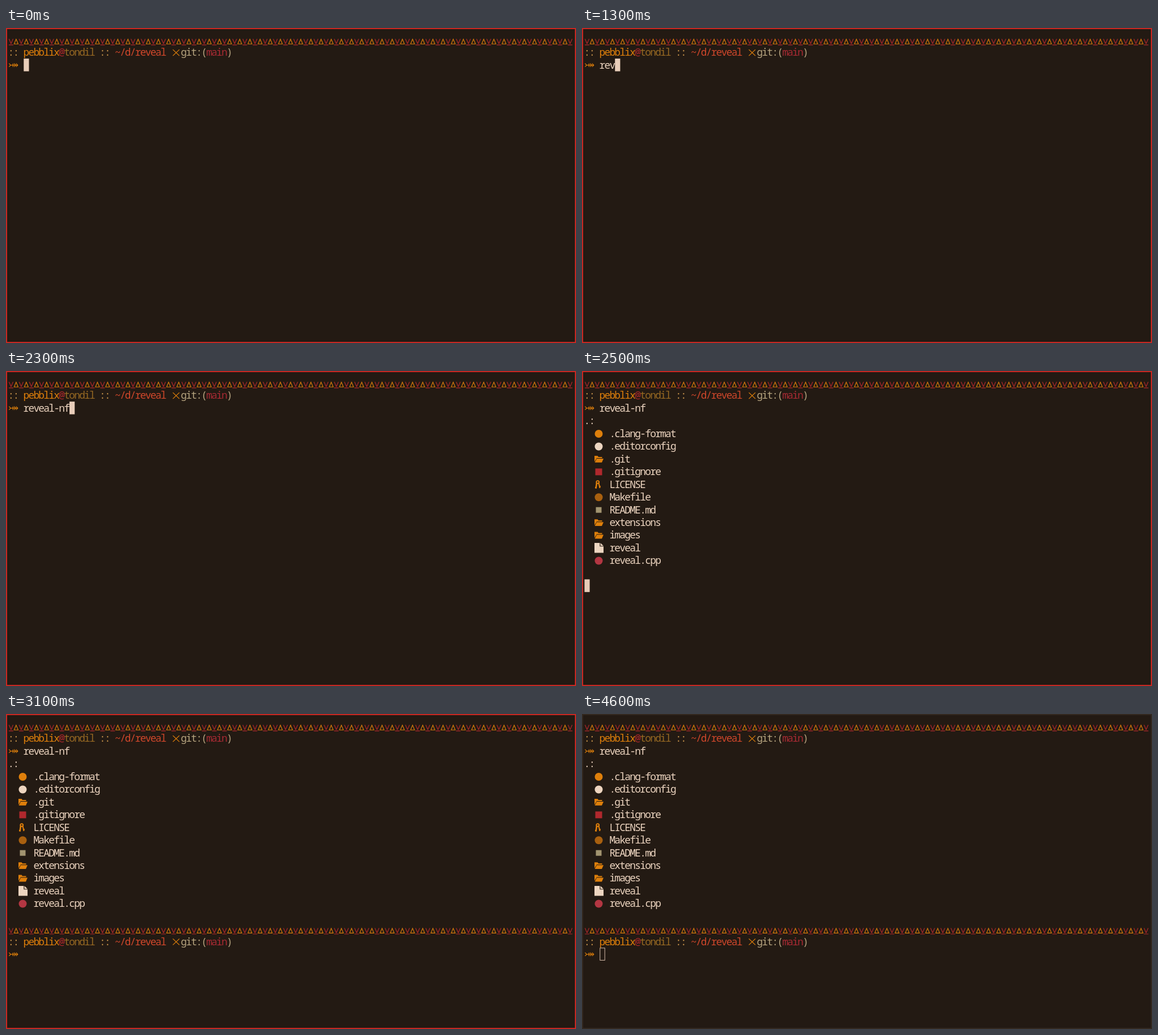
Animation, 1006 px wide and 557 px high, one loop 4.8 s. Source, as an HTML page with a canvas:

```html
<!DOCTYPE html>
<html lang="en">
<head>
<meta charset="utf-8">
<title>Terminal listing</title>
<style>
  html, body { margin: 0; width: 100%; height: 100%; overflow: hidden; background: #231a13; }
  canvas { display: block; }
</style>
</head>
<body>
<canvas id="stage" width="1006" height="557"></canvas>
<script>
const ctx = document.getElementById('stage').getContext('2d');
const LOOP = 4800, COLS = 111;
const CELL_W = 8.97, CELL_H = 22.45, LEFT = 4.4, TOP = 9.2;
const color = {
  back: '#231a13', text: '#edd5c0', orange: '#de7f0b', red: '#b0282d', crimson: '#b33642',
  brown: '#966822', gold: '#cb964c', path: '#d0472b', tan: '#b5a37e', branch: '#a82a33',
  focused: '#c92822', unfocused: '#33281f'
};
const colX = col => LEFT + col * CELL_W;
const rowY = row => TOP + row * CELL_H;

// Each letter is centred in its own terminal cell.
function write(text, col, row, fill = color.text) {
  ctx.fillStyle = fill;
  [...text].forEach((ch, i) => ctx.fillText(ch, colX(col + i + 0.5), rowY(row) + 17.8));
}

function stroke(path, x, y, paint, width = 1.15) {
  ctx.save();
  ctx.translate(x, y);
  ctx.strokeStyle = paint;
  ctx.lineWidth = width;
  ctx.stroke(new Path2D(path));
  ctx.restore();
}

function fill(path, row, paint) {
  ctx.save();
  ctx.translate(22, rowY(row));
  ctx.fillStyle = paint;
  ctx.fill(new Path2D(path));
  ctx.restore();
}

const dot = paint => row => {
  ctx.fillStyle = paint;
  ctx.beginPath();
  ctx.arc(29.5, rowY(row) + 12, 7, 0, 7);
  ctx.fill();
};
const square = (paint, size) => row => {
  ctx.fillStyle = paint;
  ctx.fillRect(29.5 - size / 2, rowY(row) + 12 - size / 2, size, size);
};
const folder = row =>
  fill('M0 6h5.5l1.5 2h6.5v2H4L0 16.5zM4 11h12l-3 6.8H.5z', row, color.orange);
const sheet = row =>
  fill('M0 3h9.3v6.2H16V20.5H0zM10.5 3L16 8.2h-5.5z', row, color.text);
const keys = row => {
  stroke('M5.8 5.2a2.4 2.4 0 1 1-.1 0M7.5 9.3l2 9', 22, rowY(row), color.orange, 2.1);
  stroke('M4 9l-1.5 10M1 17.5h3M8 15.5h2.8', 22, rowY(row), color.orange, 2.6);
};

const files = [
  ['.clang-format', dot(color.orange)],
  ['.editorconfig', dot(color.text)],
  ['.git', folder],
  ['.gitignore', square(color.red, 12)],
  ['LICENSE', keys],
  ['Makefile', dot('#a9600f')],
  ['README.md', square('#a29470', 10)],
  ['extensions', folder],
  ['images', folder],
  ['reveal', sheet],
  ['reveal.cpp', dot(color.crimson)]
];

function drawPrompt(row) {
  for (let col = 0; col < COLS; col++) {
    const x = colX(col), y = rowY(row) + 1;
    if (col % 2) stroke('M1 18L4.5 9.6 8 18z', x, y, color.orange);
    else stroke('M.9 9l3.6 8.4L8.1 9M.5 19.6h8', x, y, color.red);
  }
  const parts = [
    ['::', 0, color.gold], ['pebblix', 3, color.orange], ['@', 10, color.red],
    ['tondil', 11, color.brown], ['::', 18, color.gold], ['~/d/reveal', 21, color.path],
    ['git:(', 34, color.tan], ['main', 39, color.branch], [')', 43, color.tan]
  ];
  for (const [text, col, paint] of parts) write(text, col, row + 1, paint);
  stroke('M0 0l11.5 11M11.5 0L0 11', 294.5, rowY(row + 1) + 6.5, color.orange, 1.3);
  stroke('M0 -3l3 3-3 3M3 0H15.5M7 -3v6M9 -3l3 3-3 3M12.5 -3l3 3-3 3',
    5.3, rowY(row + 2) + 11.6, color.orange, 1.2);
}

function drawListing() {
  write('.:', 0, 3);
  files.forEach(([name, icon], i) => {
    icon(i + 4);
    write(name, 5, i + 4);
  });
}

function drawCursor(col, row, hollow) {
  const x = colX(col), y = rowY(row);
  ctx.fillStyle = ctx.strokeStyle = '#e8cdb9';
  ctx.lineWidth = 0.9;
  if (hollow) ctx.strokeRect(x + 0.5, y + 0.5, 8.4, 21.6);
  else ctx.fillRect(x, y, 9.2, CELL_H);
}

const command = 'reveal-nf';
const keyTimes = [1000, 1100, 1300, 1500, 1500, 1700, 2000, 2200, 2300];

function draw(t) {
  const idle = t >= 4600;
  ctx.fillStyle = color.back;
  ctx.fillRect(0, 0, 1006, 557);
  ctx.strokeStyle = idle ? color.unfocused : color.focused;
  ctx.lineWidth = 2;
  ctx.strokeRect(1, 1, 1004, 555);
  ctx.font = "500 condensed 17.8px 'Noto Sans Mono', monospace";
  ctx.textAlign = 'center';

  drawPrompt(0);
  const typed = keyTimes.filter(time => time <= t).length;
  write(command.slice(0, typed), 3, 2);
  if (t >= 2500) drawListing();
  if (t >= 2600) drawPrompt(16);

  const hidden = (t >= 400 && t < 900) || (t >= 3100 && t < 3600) || (t >= 4100 && t < 4600);
  if (hidden) return;
  if (t < 2500) drawCursor(3 + typed, 2);
  else if (t < 2600) drawCursor(0, 16);
  else drawCursor(3, 18, idle);
}

function tick() {
  draw(performance.now() % LOOP);
  requestAnimationFrame(tick);
}
tick();
</script>
</body>
</html>
```
